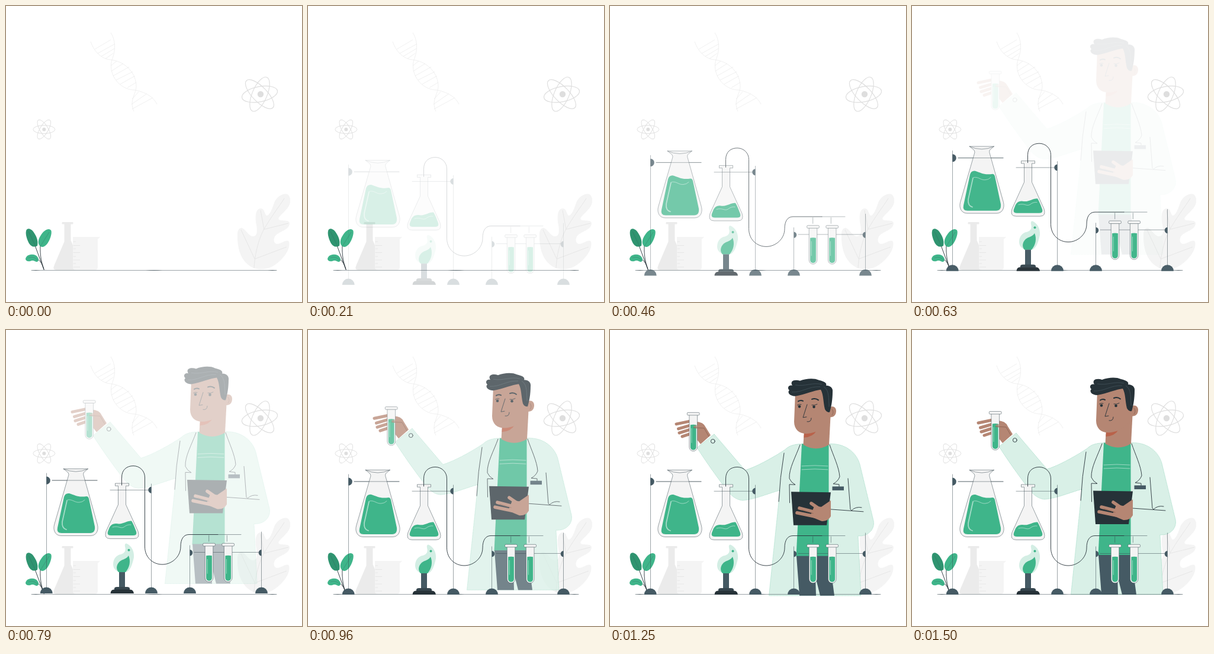
Write an HTML page that moves like this. It is 500 by 500 pixels and loops after 1540 ms.

```html
<!DOCTYPE html>
<html lang="en">
<head>
<meta charset="utf-8">
<title>Laboratory</title>
<style>
html, body { margin: 0; width: 100%; height: 100%; overflow: hidden; background: #fff; }
svg { display: block; width: 100vw; height: 100vh; }
.ln { fill: none; stroke: #37474f; stroke-width: .5; stroke-linecap: round; stroke-linejoin: round; }
.bold { stroke: #263238; stroke-width: .9; }
.brow { stroke: #263238; stroke-width: 2; }
.crease { stroke: #6d4638; }
.pale { fill: none; stroke: #e3e3e3; stroke-width: .8; }
.helix { fill: none; stroke: #e6e6e6; stroke-width: .6; }
.orbit { fill: none; stroke: #dedede; stroke-width: 1.2; }
.small { stroke-width: .9; }
.green { fill: #3fb58a; }
.slate { fill: #455a64; }
.dark { fill: #263238; }
.skin { fill: #b58673; }
.finger { fill: none; stroke: #b58673; stroke-width: 5.6; stroke-linecap: round; stroke-linejoin: round; }
.thin { stroke-width: 5; }
.coat { fill: #d9f0e7; }
.edge { stroke: #7fcdb0; stroke-width: .6; stroke-dasharray: 1.5 1; }
.glass { fill: #f4f4f4; stroke: #37474f; stroke-width: .5; }
.shine { fill: none; stroke: #a5dcc8; stroke-width: .9; stroke-linecap: round; }
.wide { stroke-width: 1.8; }
#man, #kit { opacity: 0; }
</style>
</head>
<body>
<svg viewBox="0 0 500 500">
  <defs>
    <path id="foot" class="slate" d="M-10.500 0A10.500 10.500 0 0 1 10.500 0Z"/>
    <g id="tube">
      <path class="glass" d="M-6.800 4V58.500A6.800 6.800 0 0 0 6.800 58.500V4Z"/>
      <rect class="glass" x="-10.400" width="20.800" height="4.600" rx="1.600"/>
      <path class="green" d="M-4.900 21Q0 20 4.900 21V58.500A4.900 4.900 0 0 1 -4.900 58.500Z"/>
      <path class="shine" d="M-2.800 27V51"/>
    </g>
  </defs>

  <g id="back">
    <path class="helix" d="M143 60C149 78 162 90 178 91C205 95 220 116 220 136C219 150 208 160 216 178M177 45C184 56 186 72 180 88C170 112 190 142 218 142C238 146 250 155 255 166"/>
    <path class="helix" d="M150 73L177 57M155 80L184 64M161 85L183 72M168 89L181 80M177 101L187 93M178 110L198 97M181 118L208 103M186 125L214 111M193 132L218 118M205 138L220 129M213 157L224 145M212 166L238 148M213 174L248 155"/>
    <g class="orbit" transform="translate(428.500 149)">
      <ellipse rx="30.500" ry="12.800" transform="rotate(-11)"/>
      <ellipse rx="32" ry="12.500" transform="rotate(46)"/>
      <ellipse rx="31" ry="12.500" transform="rotate(-67)"/>
      <circle cx="1.500" r="5.200" fill="#dedede" stroke="none"/>
    </g>
    <g class="orbit small" transform="translate(64.300 208.500)">
      <ellipse rx="18.500" ry="7"/>
      <ellipse rx="18.500" ry="7" transform="rotate(59)"/>
      <ellipse rx="18.500" ry="7" transform="rotate(-59)"/>
      <circle r="3" fill="#dedede" stroke="none"/>
    </g>
    <path fill="#f4f4f4" d="M391 385C391 378 395 374 399 375C405 378 410 388 416 389C424 390 425 382 423 370C420 355 422 342 430 342C438 342 436 353 441 354C447 352 450 340 454 330C460 320 470 315 477 319C482 325 481 335 475 342C467 352 458 357 461 361C467 364 480 360 479 368C477 379 463 380 455 388C451 394 452 400 457 402C465 402 474 393 478 398C481 410 470 428 450 440C438 446 426 445 419 443C400 435 390 415 391 385Z"/>
    <path class="pale" d="M419 443C421 410 430 385 440 370C452 350 462 338 470 325M420 427L397 378M421 427L474 407M436 378L430 345M437 377L477 367"/>
    <path fill="#ebebeb" d="M95 365H113Q114.500 366.700 113 368.400H109.500V396L128 438Q130 446 124 446H85Q78 446 81.500 438L98.500 398V368.400H95Q93.500 366.700 95 365Z"/>
    <path fill="#f4f4f4" d="M113 390H159L155 394V441Q155 446 150 446H118Q113 446 113 441Z"/>
    <path class="pale" d="M113.500 398H118M113.500 404.500H125M113.500 410H118M113.500 416.500H125M113.500 423H118M113.500 429H125M113.500 435H118M113.500 441H125"/>
    <path class="ln bold" d="M48 402L64 445M58 403C57 425 61 435 64 445M46 425C56 426 61 434 64 445"/>
    <path fill="#2f9470" d="M34 380C35 375 41 375 46 381C51 388 55 396 53 405C46 409 40 405 37 397C34 390 33 384 34 380Z"/>
    <path class="green" d="M75 378C78 379 77 388 73 396C69 404 64 409 58 406C53 402 54 394 59 387C64 379 71 375 75 378Z"/>
    <path class="green" d="M33 427C34 420 44 418 50 421C56 425 56 430 53 432C49 433 47 428 41 431C36 432 33 430 33 427Z"/>
    <path class="ln" opacity=".5" d="M38 381L50 406M73 382L58 406M38 425Q48 422 54 430"/>
  </g>

  <g id="man">
    <path class="coat edge" d="M176 174L228 235C248 229 278 212 296 200C304 192 315 191 325 190.500H370C396 189 416 204 422 225L445 320C448 334 437 347 419 346L424 447H268.500L287 269C265 275 246 284 224 286C211 285 203 276 194 264C178 243 161 219 147 197Z"/>
    <path class="green" d="M324 190.500H369.500V381H314.500Z"/>
    <path class="slate" d="M315 380H370L379 447H355L347 415L348 447H320Z"/>
    <path class="shine" d="M324 228Q346 226 368 228M324 234Q346 232 368 234"/>
    <path class="skin" d="M328 165L326.500 192Q348 205 370 192L373 135Z"/>
    <path fill="#b9624a" d="M328 173L349 168Q343 179 327.500 180Z"/>
    <path class="skin" d="M370 129C377 125 382 129 382 135C382 143 376 147 370 145Z"/>
    <path class="skin" d="M313 103L311 153C311 168 322 175 336 173C352 171 368 160 371 145L371 98L340 94Z"/>
    <path class="dark" d="M313 110C303 110 299 103 303 100C298 95 303 90 308 92C303 84 312 81 321 84C331 80 345 79 353 83C362 85 367 88 365 92C373 92 377 97 376 103C376 115 374 128 371 137Q366 138 363 132C360 120 361 108 356 99C345 100 330 107 313 110Z"/>
    <path fill="none" stroke="#52656d" stroke-width=".5" d="M307 103C325 104 335 93 355 94M313 91C330 94 342 86 358 90M361 94C371 100 369 115 370 128"/>
    <g class="dark">
      <circle cx="320" cy="127.500" r="2.300"/>
      <circle cx="344.500" cy="128" r="2.300"/>
    </g>
    <path class="ln bold" d="M333 124L326 146L332 145M333 153Q340 154 340 147M316.500 125Q319 123 323 124M341 125Q346 126 350 123.500"/>
    <path class="ln crease" d="M375 132Q379 137 375 142"/>
    <path class="ln brow" d="M318 118.500Q322 116 326 118M341 115Q347 112.500 352 116.500"/>
    <path class="ln bold" d="M321 192C314 212 302 232 303 249Q306 256 313 259.500L303 259L303.500 290M294 206Q287 248 285 288M371 192C377 210 387 230 388 246Q385 254 377 258L387 259V263M402 249L406 301L408 303Q415 296 425 298M372 301L428 305"/>
    <rect class="slate" x="375.500" y="262.500" width="19.500" height="6.500"/>
    <path class="dark" d="M306 271.500L373 272.500L366 328H310Z"/>
    <path class="skin" d="M373 286V313Q368 322 357 321L338 313L345 296L357 297Z"/>
    <path class="finger" d="M340 291L356 302M320 299L347 306M316 307L345 313M352 299L362 312"/>
    <path class="ln crease" d="M324 302L343 308"/>

    <path class="finger thin" d="M112 157L136 152M115.500 165L136 159M117 172L136 166M122 178L137 173"/>
    <path class="skin" d="M144 153Q158 153 162 163L170 176L153 191L145 181Z"/>
    <use href="#tube" x="140.700" y="137.500"/>
    <path class="skin" opacity=".65" d="M141 161Q142 159 147 159L158 162L155 166L142 164Z"/>
    <path class="ln crease" d="M141 163L159 164L167 178"/>
    <circle class="ln bold" cx="173.800" cy="186" r="3.400"/>
  </g>

  <path class="ln" d="M43 446.500H457"/>
  <path fill="#37474f" opacity=".7" d="M43 446.500Q50 445.700 58 446.500Q50 447.300 43 446.500ZM236 446.500Q250 445.500 264 446.500Q250 447.500 236 446.500ZM442 446.500Q450 445.700 458 446.500Q450 447.300 442 446.500Z"/>

  <g id="kit">
    <path class="ln" d="M68.500 244V440M245.500 262V440M310.500 366V440M431.500 343V440M78 256H154M318 377.500H427"/>
    <use href="#foot" x="68.200" y="447"/>
    <use href="#foot" x="245.500" y="447"/>
    <use href="#foot" x="310.500" y="447"/>
    <use href="#foot" x="431.500" y="447"/>
    <path class="slate" d="M68.200 249.500A6.600 6.600 0 0 1 68.200 262.700ZM245.500 266.800A5.200 5.400 0 0 0 245.500 277.600ZM310.500 373A4.800 5.200 0 0 1 310.500 383.400ZM431.500 373A4.800 5.200 0 0 0 431.500 383.400Z"/>

    <path class="glass" d="M97 236.500H138.500Q133 241 131 243Q130 246 132 251L154.500 331C157 341 152 349.500 143 349.500H93C84 349.500 79 341 81.500 331L105 250Q107 246 105 243Q103 241 97 236.500Z"/>
    <path class="ln" d="M97 236.500Q118 246 138.500 236.500M78 256H154"/>
    <path class="green" d="M98 284Q100 277 107 278C117 281 121 285 136 283Q139 283 140 287L150 334Q151 345 142 345H94Q85 345 87 336Z"/>
    <path class="shine wide" d="M103 290L95 326Q94 337 102 339"/>
    <path class="shine" d="M104 289C112 287 116 294 124 293Q129 293 133 289"/>

    <path class="glass" d="M184.500 261H207.500V265.300H202.500V297L223 342Q227 354.500 216 354.500H176Q165 354.500 169 342L189.500 297V265.300H184.500Z"/>
    <path class="ln" d="M176 272.300H241"/>
    <path class="green" d="M175 335Q179 328 187 329C198 331 203 324 212 324.500Q215 329 219 340Q223 349 215 349H177Q169 349 173 340Z"/>
    <path class="shine" d="M180 335C190 332 193 338 199 335Q205 330 211 331"/>

    <path fill="#d3eee4" d="M203 362.500C212 366 217 376 216 386C214 396 210 410 202 411C190 413 181 407 181 398C181 388 187 382 194 381C201 379 203 374 201 368Q200 363 203 362.500Z"/>
    <path class="green" d="M207 383C211 392 209 403 202 411H190C185 405 187 398 192 393C197 389 204 389 207 383Z"/>
    <circle class="green" cx="207.500" cy="373.600" r="2"/>
    <rect class="slate" x="191" y="411" width="10" height="27"/>
    <path fill="#37474f" d="M183 441V438Q184 436 187 436H205Q208 436 209 438V441Z"/>
    <path class="dark" d="M176.500 447Q177 440.500 182 440.500H210Q215 440.500 216 447Z"/>

    <path class="ln bold" d="M195.500 264V251C195.500 238 204 231.500 215 231.500S234.500 240 234.500 251V368C234.500 386 248 398 264 398S295 385 295 368C295 355 300 347.500 309 347.500H358"/>
    <path class="ln" d="M358 347.500H397M342.700 349V359M373.300 349V359"/>
    <use href="#tube" x="343" y="362.300"/>
    <use href="#tube" x="375.200" y="362.300"/>
  </g>
</svg>
<script>
const LOOP = 1540, FPS = 24;
const man = document.getElementById("man");
const kit = document.getElementById("kit");
const start = performance.now();

const cubic = (a, b, u) => 3 * (1 - u) * (1 - u) * u * a + 3 * (1 - u) * u * u * b + u ** 3;

// cubic-bezier(.36, -.01, .5, 1.38)
function ease(x) {
  if (x <= 0) return 0;
  if (x >= 1) return 1;
  let lo = 0, hi = 1;
  for (let i = 0; i < 24; i++) {
    const mid = (lo + hi) / 2;
    if (cubic(0.36, 0.5, mid) < x) lo = mid; else hi = mid;
  }
  return cubic(-0.01, 1.38, lo);
}

function slide(el, time, from) {
  const p = ease(time);
  el.style.opacity = Math.max(0, Math.min(1, p));
  el.setAttribute("transform", `translate(0 ${(from * (1 - p)).toFixed(3)})`);
}

function draw() {
  const now = (performance.now() - start) % LOOP;
  const step = Math.floor((now + 5) * FPS / 1000);
  // the bench stays empty for the first three steps
  const time = step < 3 ? 0 : 1.02 * step / FPS + 0.02;
  slide(kit, time, 30);
  slide(man, time - 0.5, -30);
  requestAnimationFrame(draw);
}
draw();
</script>
</body>
</html>
```
